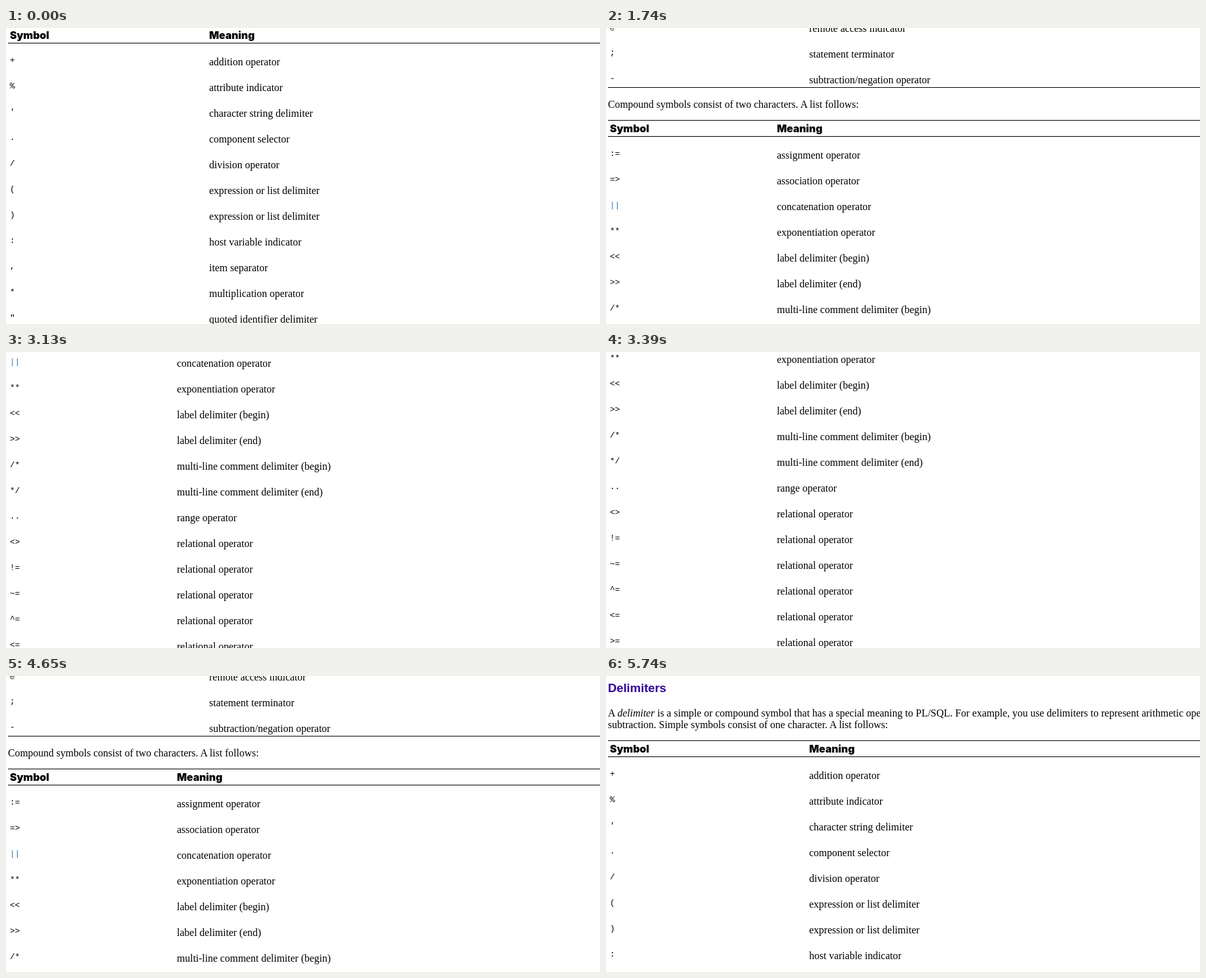
Write an HTML page that moves like this. It is 921 px wide and 460 px high and loops after 6980 ms.

```html
<!DOCTYPE html>
<html lang="en">
<head>
<meta charset="utf-8">
<title>Delimiters</title>
<style>
  html, body { margin: 0; width: 100%; height: 100%; overflow: hidden; background: #fff; }
  svg { display: block; width: 921px; height: 460px; }
  text { font: 16px "Liberation Serif", "Times New Roman", serif; white-space: pre; }
  .title { font: bold 18.72px "Liberation Sans", Arial, sans-serif; fill: #309; }
  .head { font: 900 16px "Arial Black", Inter, sans-serif; }
  .code { font: 13px "Liberation Mono", "Courier New", monospace; }
  .link { fill: #2a71b8; }
  .it { font-style: italic; }
</style>
</head>
<body>
<svg viewBox="0 0 921 460"><g id="page"></g></svg>
<script>
const LOOP = 6980;
const page = document.getElementById("page");

const simple = [
  ["+", "addition operator"], ["%", "attribute indicator"],
  ["'", "character string delimiter"], [".", "component selector"],
  ["/", "division operator"], ["(", "expression or list delimiter"],
  [")", "expression or list delimiter"], [":", "host variable indicator"],
  [",", "item separator"], ["*", "multiplication operator"],
  ['"', "quoted identifier delimiter"], ["=", "relational operator"],
  ["<", "relational operator"], [">", "relational operator"],
  ["@", "remote access indicator"], [";", "statement terminator"],
  ["-", "subtraction/negation operator"]
];
const compound = [
  [":=", "assignment operator"], ["=>", "association operator"],
  ["||", "concatenation operator"], ["**", "exponentiation operator"],
  ["<<", "label delimiter (begin)"], [">>", "label delimiter (end)"],
  ["/*", "multi-line comment delimiter (begin)"],
  ["*/", "multi-line comment delimiter (end)"],
  ["..", "range operator"], ["<>", "relational operator"],
  ["!=", "relational operator"], ["~=", "relational operator"],
  ["^=", "relational operator"], ["<=", "relational operator"],
  [">=", "relational operator"], ["--", "single-line comment indicator"]
];

function add(tag, attrs, parent = page) {
  const el = document.createElementNS("http://www.w3.org/2000/svg", tag);
  for (const key in attrs) el.setAttribute(key, attrs[key]);
  return parent.appendChild(el);
}

function write(x, y, text, cls = "") {
  const el = add("text", { x, y, class: cls });
  el.textContent = text;
  return el;
}

function rule(y) {
  add("rect", { x: 3, y, width: 918, height: 1 });
}

function table(top, meaningX, rows) {
  rule(top);
  rule(top + 25);
  write(6, top + 19, "Symbol", "head");
  write(meaningX, top + 19, "Meaning", "head");
  rows.forEach(([symbol, meaning], i) => {
    const y = top + 55 + 40 * i;
    write(6, y + 1, symbol, symbol === "||" ? "code link" : "code");
    write(meaningX, y + 5, meaning);
  });
  rule(top + 26 + 40 * rows.length);
}

write(3, 25, "Delimiters", "title");
const intro = write(3, 63, "A ");
add("tspan", { class: "it" }, intro).textContent = "delimiter";
add("tspan", {}, intro).textContent = " is a simple or compound symbol that has a special meaning to PL/SQL. " +
  "For example, you use delimiters to represent arithmetic operations such as addition and";
write(3, 81, "subtraction. Simple symbols consist of one character. A list follows:");
table(100, 315, simple);
write(3, 838, "Compound symbols consist of two characters. A list follows:");
table(857, 265, compound);

// Scroll gestures: start, end, visible steps, first and last offset, ease-out power
const moves = [
  [1440, 1740, 6, 109, 714, 5.2],
  [2550, 2880, 6, 719, 867, 5.2],
  [3060, 3390, 6, 874, 1020, 5.2],
  [4000, 4650, 11, 1016, 713, 1],
  [4710, 5340, 10, 650, 102, 1],
  [5410, 5740, 6, 95, 0, 5.2]
];

function scrollAt(t) {
  const move = moves.findLast(m => t >= m[0]);
  if (!move) return 102;
  const [start, end, steps, from, to, power] = move;
  const last = steps - 1;
  const step = Math.floor(Math.min(1, (t - start) / (end - start)) * last + 1e-6);
  return Math.round(from + (to - from) * (1 - (1 - step / last) ** power));
}

function draw() {
  page.setAttribute("transform", `translate(0 ${-scrollAt(performance.now() % LOOP)})`);
  requestAnimationFrame(draw);
}
draw();
</script>
</body>
</html>
```
